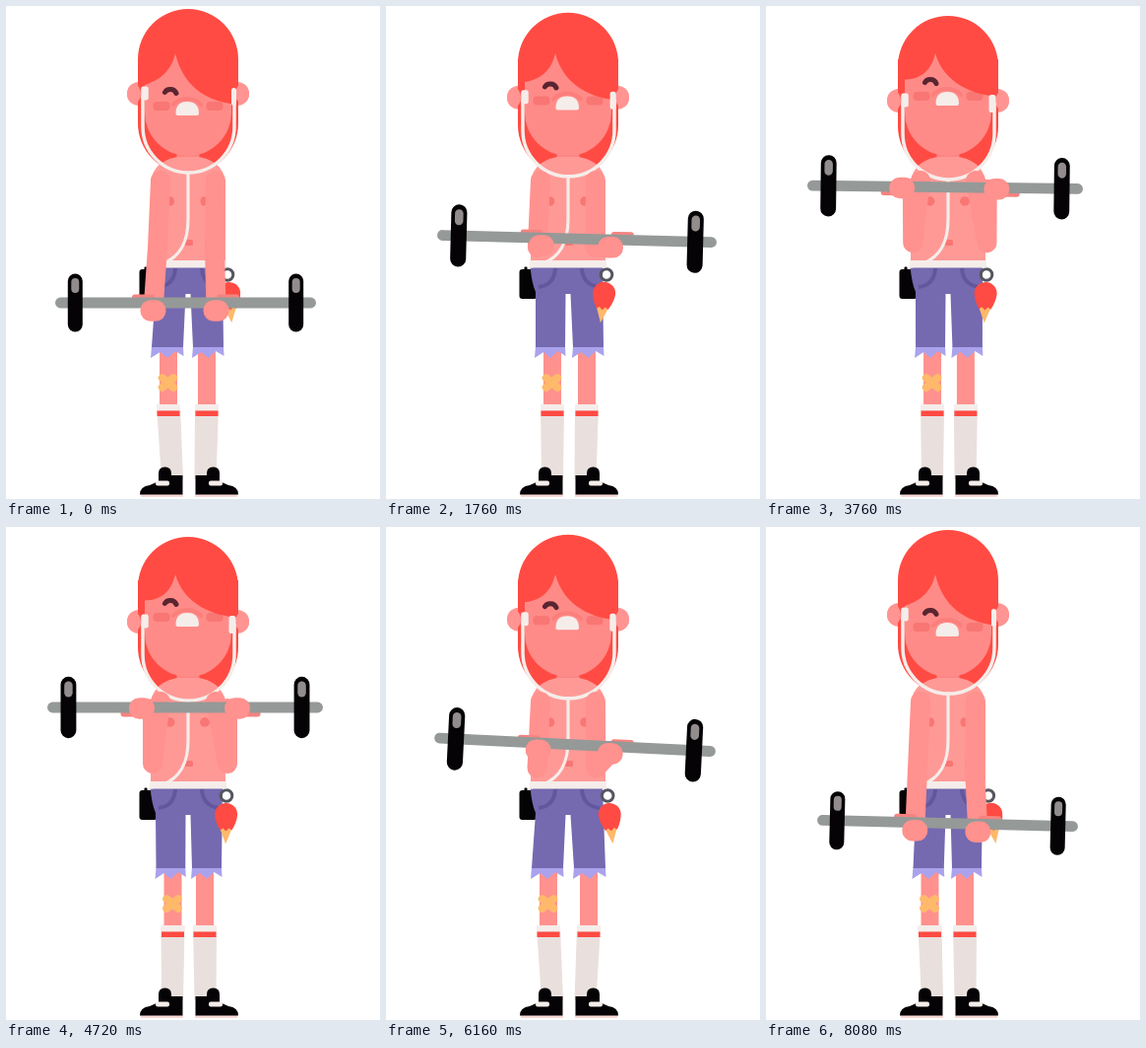
An HTML page with a canvas that plays this animation: 380 px wide and 500 px high, repeating every 8160 ms.

```html
<!DOCTYPE html>
<html lang="en">
<head>
<meta charset="utf-8">
<title>Barbell curl</title>
<style>
html, body { margin: 0; width: 100%; height: 100%; overflow: hidden; background: #fff; }
canvas { display: block; width: 380px; height: 500px; }
</style>
</head>
<body>
<canvas id="stage" width="380" height="500"></canvas>
<script>
const ctx = document.getElementById('stage').getContext('2d');
const LOOP = 8160, STEP = 80;
const C = {
  hair: '#ff4b43', skin: '#ff918e', face: '#ff8b88', ear: '#ff9492', torso: '#ff9996',
  mark: '#f87673', nose: '#fb7f7c', neck: '#fb8583',
  shorts: '#7569b0', pocket: '#62579c', cuff: '#aaa2ec', sock: '#e9e0dd', white: '#f5edea',
  black: '#050305', bar: '#959997', grey: '#928c8c', brow: '#592530', gold: '#ffb96b'
};

// time, lift, bar left, bar right, tilt, left knee, right knee, charm swing
const keys = [
  [0, 0, 50, 315, 0, 0, 1, 5],
  [880, .19, 57, 327, 1, 2, 1, -2],
  [1760, .55, 52, 336, 1.5, 4, 1, -7],
  [2880, .92, 44, 325, 3, 4, 0, -4],
  [3520, .99, 42, 322, 1, 4, 0, -3],
  [4720, 1, 42, 322, 0, 4.5, -1, -1],
  [5280, .96, 43, 324, 1.5, 2, 1, 3],
  [6160, .68, 49, 335, 2.8, 0, 3, 6],
  [7120, .275, 57, 331, 1, 0, -1, 8],
  [8080, .004, 52, 317, 1.4, 1.5, -1, 9]
];

const gradient = (i, c) => (keys[i + 1][c] - keys[i][c]) / (keys[i + 1][0] - keys[i][0]);

function slope(i, c) {
  if (i === 0 || i === keys.length - 1) return 0;
  const a = gradient(i - 1, c), b = gradient(i, c);
  return a * b <= 0 ? 0 : 2 * a * b / (a + b);
}

// Monotone cubic interpolation
function track(t, c) {
  const last = keys.length - 1;
  if (t >= keys[last][0]) return keys[last][c];
  let i = 0;
  while (t >= keys[i + 1][0]) i++;
  const d = keys[i + 1][0] - keys[i][0], u = (t - keys[i][0]) / d, v = 1 - u;
  return (1 + 2 * u) * v * v * keys[i][c] + u * v * v * d * slope(i, c)
       + u * u * (3 - 2 * u) * keys[i + 1][c] - u * u * v * d * slope(i + 1, c);
}

function fill(color, d) {
  ctx.fillStyle = color;
  ctx.fill(new Path2D(d));
}

function line(color, width, d, cap = 'round') {
  ctx.strokeStyle = color;
  ctx.lineWidth = width;
  ctx.lineCap = cap;
  ctx.lineJoin = 'round';
  ctx.stroke(new Path2D(d));
}

function pill(color, cx, cy, w, h, r = Math.min(w, h) / 2) {
  ctx.fillStyle = color;
  ctx.beginPath();
  ctx.roundRect(cx - w / 2, cy - h / 2, w, h, r);
  ctx.fill();
}

function oval(color, cx, cy, rx, ry = rx) {
  ctx.fillStyle = color;
  ctx.beginPath();
  ctx.ellipse(cx, cy, rx, ry, 0, 0, Math.PI * 2);
  ctx.fill();
}

function at(x, y, angle, draw) {
  ctx.save();
  ctx.translate(x, y);
  ctx.rotate(angle);
  draw();
  ctx.restore();
}

// x is the left edge of the sock top, foot the left edge at the shoe
function leg(x, foot) {
  fill(C.skin, `M${x + 3} 345H${x + 21}V408H${x + 3}Z`);
  fill(C.sock, `M${x} 406Q${x} 404 ${x + 2} 404H${x + 22}Q${x + 24} 404 ${x + 24} 406L${foot + 22} 480H${foot}Z`);
  fill(C.white, `M${x} 404H${x + 24}V410H${x}Z`);
  fill(C.hair, `M${x + .5} 410.500H${x + 23.5}V416H${x + .5}Z`);
}

function shoe(flip) {
  ctx.save();
  if (flip) { ctx.translate(372, 0); ctx.scale(-1, 1); }
  fill('#f8d8d5', 'M137 495H180V498H137Z');
  fill(C.black, 'M136 495.500Q136 487 146 486L155 482V474Q155 467.500 161.500 467.500Q168 467.500 168 474V476H179.500V495.500Z');
  pill(C.white, 159, 484, 14, 5, 2);
  ctx.restore();
}

function cuff(a, b) {
  const x = u => a + (b - a) * u;
  fill(C.cuff, `M${a} 345H${b}L${b + .5} 355L${x(.75)} 350L${x(.5)} 357L${x(.27)} 351L${a - 1} 357Z`);
}

function lowerBody(kl, kr) {
  const left = 148 + kl, right = 220 + kr;
  const innerLeft = 180 + kl * .5, innerRight = 189.5 + kr * .5;
  leg(153 + kl, 158);
  leg(191 + kr, 191.5);
  at(164.5 + kl, 382, 0, () => {
    for (const a of [-.7, .7]) at(0, 0, a, () => pill(C.gold, 0, 0, 23, 8, 4));
  });
  shoe(false);
  shoe(true);

  pill(C.black, 144.5, 282, 18, 30, 3);
  pill(C.black, 142, 267, 3, 5, 1);
  cuff(left, innerLeft);
  cuff(innerRight, right);
  fill(C.shorts, `M146.500 264Q148 281 152 290L${left} 346H${innerLeft}L182.500 292H187.500L${innerRight} 346H${right}L220 264Z`);
  line(C.pocket, 4, 'M172 266Q171 283 155 285M199 266Q200 283 217 285', 'butt');
}

function charm(swing) {
  const x = 224 + Math.max(0, swing) * .2;
  ctx.strokeStyle = '#55565e';
  ctx.lineWidth = 3;
  ctx.beginPath();
  ctx.arc(x, 272.5, 5.8, 0, Math.PI * 2);
  ctx.stroke();
  at(x, 272.5, -Math.atan2(swing * .85, 48), () => {
    fill(C.gold, 'M-7 31H7L0 49Z');
    fill(C.hair, 'M-11.500 19A11.500 11.500 0 0 1 11.500 19Q11 27 6 35L3 33L0 36L-3 33L-6 35Q-11 27 -11.500 19Z');
  });
}

function torso(p) {
  fill(C.neck, 'M173.500 138H196.500V162H173.500Z');
  fill(C.torso, 'M147 259V182C147 165 158 156 174 153H196C212 156 223 165 223 182V259Z');
  fill(C.white, 'M146 258H224V265.500H146Z');
  const w = 3.5 + 1.5 * p;
  oval(C.mark, 167.5 - p, 198, w, 4.7);
  oval(C.mark, 201 + p, 198, w, 4.7);
  pill(C.mark, 186, 240, 8, 6, 1.5);
  line(C.white, 3.2, `M185 ${170 + 7 * p}V216C185 240 177 254 160 261L148 264`);
}

function head(p) {
  const h = 7 * p, f = -10 * p;
  oval(C.ear, 135, 89 + h, 12);
  oval(C.ear, 235, 89 + h, 12);
  fill(C.hair, `M134 54H141V${110 + h}H134ZM229 54H236V${110 + h}H229Z`);
  fill(C.face, 'M141 46H229V108A44 44 0 0 1 141 108Z');

  // facial features rise while the head sinks
  at(0, f, 0, () => {
    pill(C.mark, 158, 101.5, 17, 9, 4);
    pill(C.mark, 212, 101.5, 17, 9, 4);
    line(C.nose, 4, 'M170 100Q175 94 184 94Q193 94 198 100');
    fill(C.white, 'M172.500 109Q172.500 97 184 97Q196 97 196 109Q196 111 194 111H174.500Q172.500 111 172.500 109Z');
    line(C.brow, 5, 'M161.500 87.500Q163 84.500 167 84.500Q171.500 84.500 173 88.500');
  });

  const side = 54 + h, left = 82 - 8 * p, right = 100 - 8 * p;
  fill(C.hair, `M134 ${left}V${side}A51 51 0 0 1 236 ${side}V${right}
    C211 ${right - 2} 181 ${right - 13} 172 48C168 66 156 77 134 ${left}Z`);

  at(0, h, 0, () => {
    oval(C.ear, 130, 89, 7, 10);
    oval(C.ear, 240, 89, 7, 10);
    line(C.white, 3.5, 'M139 92V122.500A46.500 46.500 0 0 0 232 122.500V92');
    pill(C.white, 141, 88.5, 7.5, 14, 2.5);
    pill(C.white, 231.5 - 1.5 * p, 92, 5 + 2 * p, 18, 2.5);
  });
}

function backHair(p) {
  const low = 119 + 3 * p;
  fill(C.hair, `M134 ${54 + 7 * p}H236V${low}A51 51 0 0 1 134 ${low}Z`);
}

function armsAndBar(p, xl, xr, tilt) {
  const cx = (xl + xr) / 2, cy = 301 - 118 * p;
  const a = tilt * Math.PI / 180, len = xr - xl, s = len / 265;
  const q = Math.pow(p, 6);
  const hands = [-33 - 5 * p - 6 * q, 31 + 5 * p + 17 * q];
  const drop = 8 - 7 * q;
  const place = x => [cx + x * Math.cos(a) - drop * Math.sin(a), cy + x * Math.sin(a) + drop * Math.cos(a)];
  const [lx, ly] = place(hands[0]), [rx, ry] = place(hands[1]);
  const elbowY = 245 - 5 * q;

  // raised forearms stand upright, with the hands turned outwards
  line(C.skin, 20, `M157 177L${154 - 5 * q} ${elbowY}L${lx + 11 * q} ${ly}`);
  line(C.skin, 20, `M213 177L${212 + 13 * q} ${elbowY}L${rx - 10 * q} ${ry}`);

  at(cx, cy, a, () => {
    hands.forEach((x, i) => pill('#f58380', x + (i ? 12 : -10), -5 + 11 * q, 23, 7, 3));
    pill(C.bar, 0, 0, len, 10.8);
    for (const side of [-1, 1]) {
      const x = side * (len / 2 - 20.3 * s);
      pill(C.black, x, 0, 15 * s, 59 * s);
      pill(C.grey, x, -17.5 * s, 8 * s, 15 * s);
    }
    for (const x of hands) pill(C.skin, x, drop, 26, 21.5, 10.5);
  });
}

function draw(t) {
  const [p, xl, xr, tilt, kl, kr, swing] = [1, 2, 3, 4, 5, 6, 7].map(c => track(t, c));
  ctx.fillStyle = '#fff';
  ctx.fillRect(0, 0, 380, 500);
  backHair(p);
  lowerBody(kl, kr);
  charm(swing);
  torso(p);
  head(p);
  armsAndBar(p, xl, xr, tilt);
}

const start = performance.now();
function frame() {
  const t = (performance.now() - start) % LOOP;
  draw(Math.floor(t / STEP) * STEP);
  requestAnimationFrame(frame);
}
frame();
</script>
</body>
</html>
```
